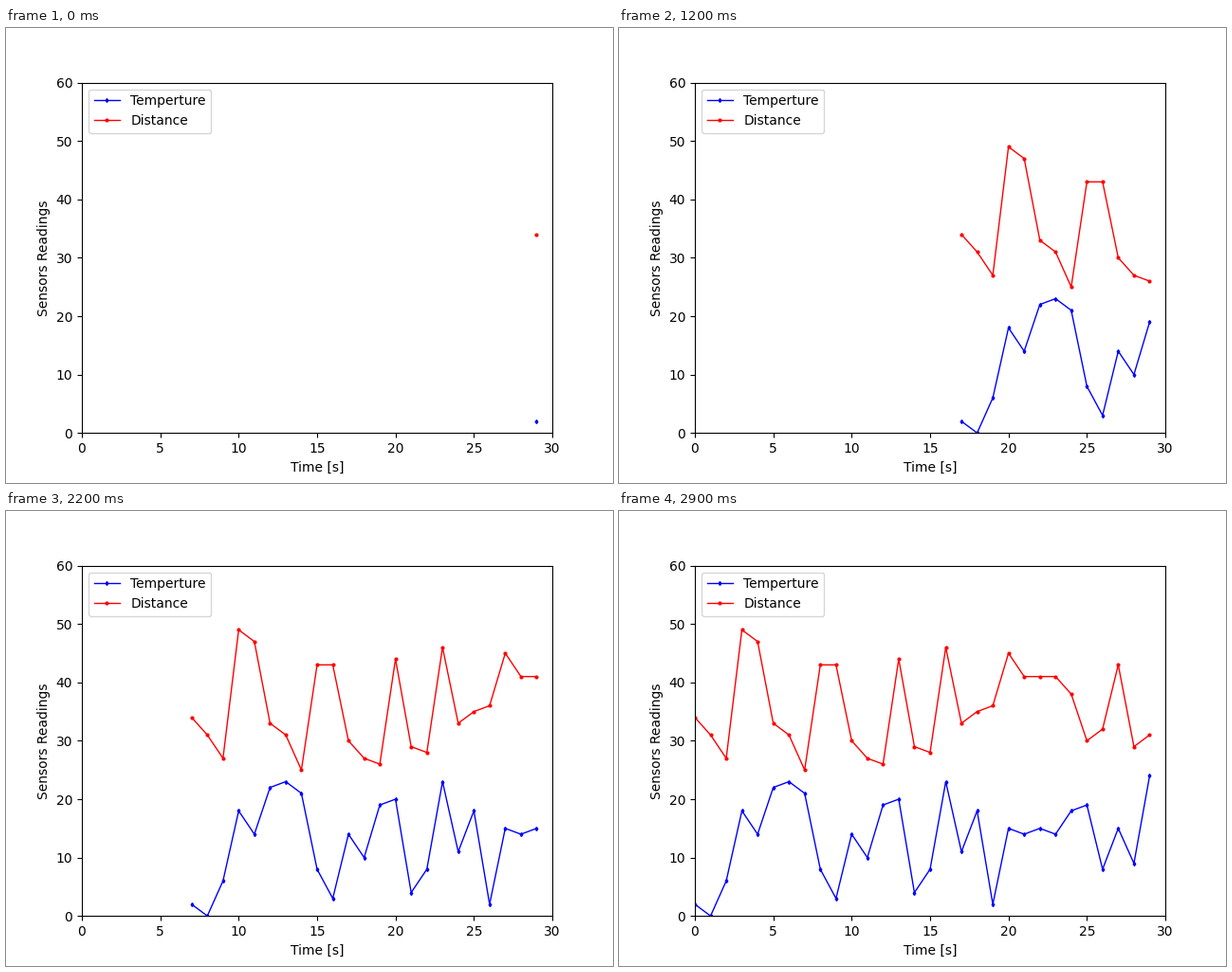
Recreate the animation shown at these times as a matplotlib script. Size 640 by 480 pixels, loop 3 s.

```python
import numpy as np
import matplotlib.pyplot as plt
from matplotlib.animation import FuncAnimation

plt.rcParams["font.family"] = "DejaVu Sans"

SPAN = 30
TEMPERATURE = np.array([
    2, 0, 6, 18, 14, 22, 23, 21, 8, 3, 14, 10, 19, 20, 4,
    8, 23, 11, 18, 2, 15, 14, 15, 14, 18, 19, 8, 15, 9, 24])
DISTANCE = np.array([
    34, 31, 27, 49, 47, 33, 31, 25, 43, 43, 30, 27, 26, 44, 29,
    28, 46, 33, 35, 36, 45, 41, 41, 41, 38, 30, 32, 43, 29, 31])

fig, ax = plt.subplots(figsize=(6.4, 4.8), dpi=100)
style = dict(linewidth=1, markersize=2)
temp_line, = ax.plot([], [], "b-d", label="Temperture", **style)
dist_line, = ax.plot([], [], "r-o", label="Distance", **style)

ax.set_xlim(0, SPAN)
ax.set_ylim(0, 60)
ax.set_xlabel("Time [s]")
ax.set_ylabel("Sensors Readings")
ax.legend(loc="upper left")


def update(step):
    """Show the readings so far, with the newest at the right edge."""
    count = step + 1
    x = np.arange(SPAN - count, SPAN)
    temp_line.set_data(x, TEMPERATURE[:count])
    dist_line.set_data(x, DISTANCE[:count])
    return temp_line, dist_line


anim = FuncAnimation(fig, update, frames=SPAN, interval=100, repeat=True)
plt.show()
```
